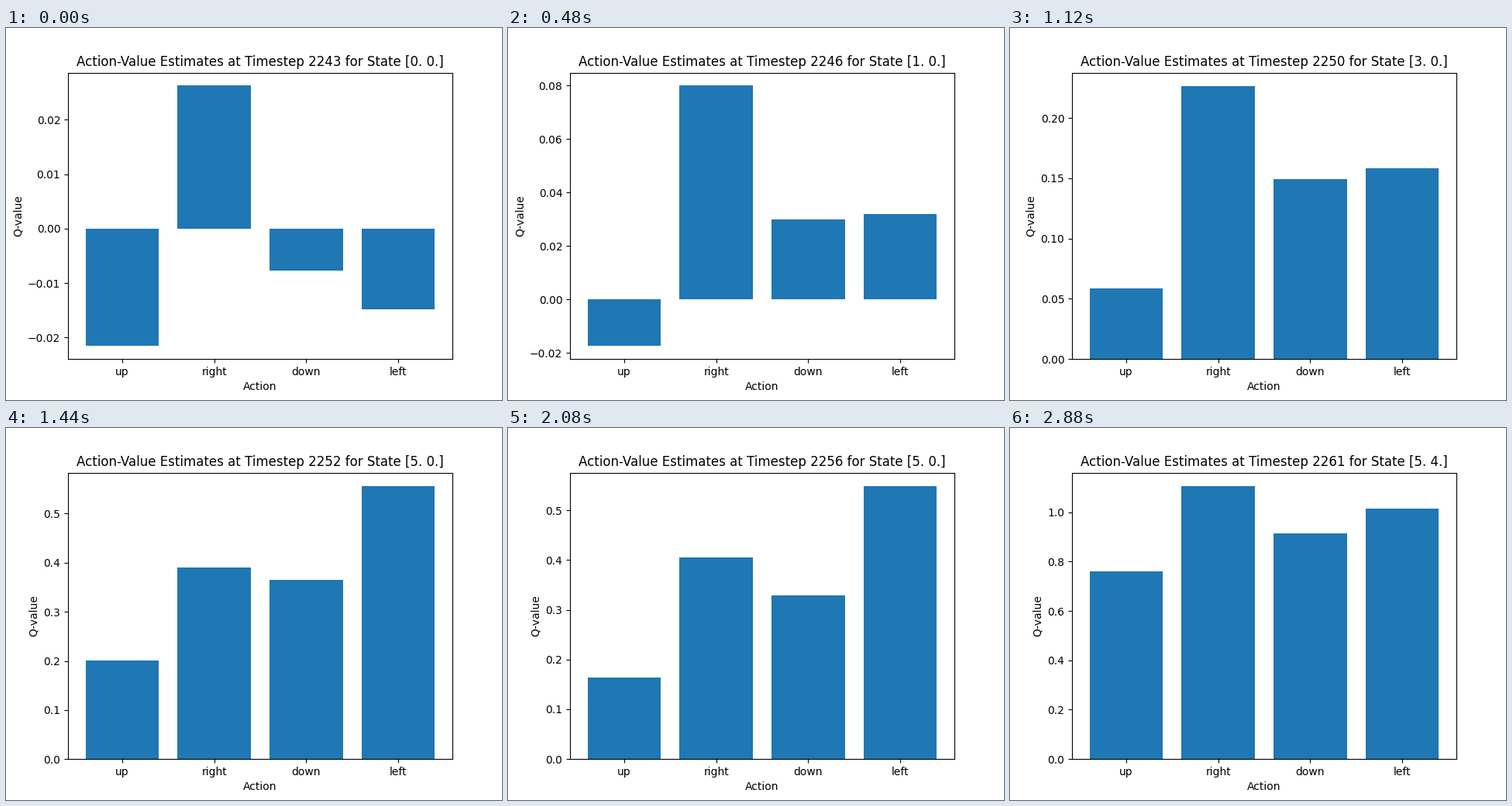
Animation of 640 by 480 pixels, one loop 3040 ms. Source, as a matplotlib script:

```python
from itertools import accumulate

import matplotlib.pyplot as plt
import numpy as np
from matplotlib.animation import FuncAnimation

ACTIONS = ["up", "right", "down", "left"]
FIRST_TIMESTEP = 2243
STEP_MS = 160
CORNER = 5  # the route runs along x up to here, then climbs in y

# Position along the route at each timestep, from forward/back/stay moves.
MOVES = {"+": 1, "-": -1, "0": 0}
ROUTE = list(accumulate((MOVES[m] for m in "++-+++-++--++++++0"), initial=0))

# Q-values on the first visit, at a few positions along the route.
FIRST_Q = {
    0: (-0.02159, 0.02627, -0.0077, -0.0148),
    1: (-0.0175, 0.08, 0.03, 0.032),
    2: (0.0233, 0.15985, 0.081, 0.0955),
    3: (0.0646, 0.2363, 0.1592, 0.1646),
    5: (0.2008, 0.3903, 0.365, 0.5557),
    7: (0.56, 0.81, 0.65, 0.867),
    8: (0.6775, 0.9296, 0.7323, 0.9647),
    9: (0.76, 1.1048, 0.914, 1.0144),
}
# Change of the Q-values per timestep since the first visit.
DRIFT = {
    2: (0, 0, 0, 0),
    3: (-0.003, -0.005, -0.005, -0.003),
    5: (-0.00925, 0.0037, -0.00905, -0.0019),
    9: (0, 0, 0, 0),
}


def along_route(keys, position):
    """Interpolate each action's value between the key positions."""
    return np.array([np.interp(position, list(keys), values)
                     for values in zip(*keys.values())])


def q_values(step):
    position = ROUTE[step]
    age = step - ROUTE.index(position)
    return along_route(FIRST_Q, position) + age * along_route(DRIFT, position)


plt.rcParams["font.family"] = "DejaVu Sans"
fig, ax = plt.subplots(figsize=(6.4, 4.8), dpi=100)


def draw(step):
    x = min(ROUTE[step], CORNER)
    y = ROUTE[step] - x
    ax.clear()
    ax.bar(ACTIONS, q_values(step), color="#1f77b4")
    ax.set_xlabel("Action")
    ax.set_ylabel("Q-value")
    ax.set_title(f"Action-Value Estimates at Timestep {FIRST_TIMESTEP + step} "
                 f"for State [{x}. {y}.]")
    return ax.patches


anim = FuncAnimation(fig, draw, frames=len(ROUTE), init_func=lambda: draw(0),
                     interval=STEP_MS, repeat=True, repeat_delay=0)
plt.show()
```
